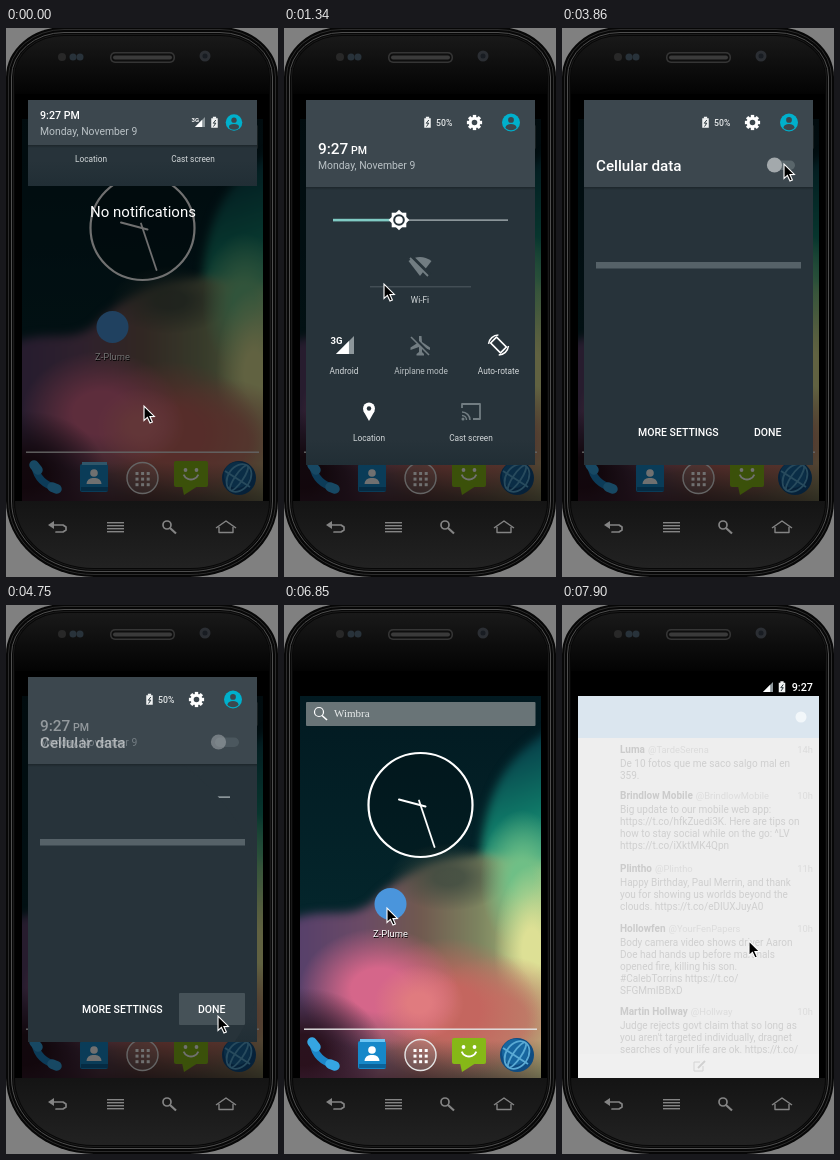
Recreate the animation shown at these times as an HTML page with a canvas. Size 272 px wide and 549 px high, loop 8 s.

```html
<!DOCTYPE html>
<html lang="en">
<head>
<meta charset="utf-8">
<title>Phone quick settings</title>
<style>
html, body { margin: 0; width: 100%; height: 100%; overflow: hidden; background: #808080; }
canvas { display: block; width: 272px; height: 549px; }
</style>
</head>
<body>
<canvas id="stage"></canvas>
<script>
const W = 272, H = 549, LOOP = 8000, STEP = 148.5;
const canvas = document.getElementById('stage');
const c = canvas.getContext('2d');
const dpr = window.devicePixelRatio || 1;
canvas.width = W * dpr;
canvas.height = H * dpr;

const BODY = '#27333a', HEAD = '#3c474e', TEAL = '#80cbc4', FAINT = '#727d82', CYAN = '#00b0cc';
const clamp = v => Math.max(0, Math.min(1, v));
const ramp = (t, a, b) => clamp((t - a) / (b - a));
const ease = p => p * p * (3 - 2 * p);
const mix = (a, b, p) => a + (b - a) * p;

// Pointer tip: time, x, y
const POINTER = [
  [0, 138, 378], [150, 138, 378], [1340, 100, 256], [2230, 60, 320], [2520, 60, 322],
  [2820, 68, 330], [3560, 222, 136], [3860, 222, 136], [4450, 212, 411], [4900, 212, 411],
  [5280, 132, 395], [5650, 121, 290], [5940, 120, 275], [6100, 120, 275], [6700, 103, 303],
  [7300, 103, 303], [7870, 187, 336]
];

function pointerAt(t) {
  let i = 0;
  while (i < POINTER.length - 2 && POINTER[i + 1][0] <= t) i++;
  const [t0, x0, y0] = POINTER[i], [t1, x1, y1] = POINTER[i + 1];
  const p = ease(ramp(t, t0, t1));
  return [mix(x0, x1, p), mix(y0, y1, p)];
}

function text(s, x, y, size, color = '#fff', weight = 400, align = 'left') {
  c.font = `${weight} ${size}px Roboto, sans-serif`;
  c.textAlign = align;
  c.fillStyle = color;
  c.fillText(s, x, y);
}

function rect(x, y, w, h, color) {
  c.fillStyle = color;
  c.fillRect(x, y, w, h);
}

function round(x, y, w, h, r, color) {
  c.beginPath();
  c.roundRect(x, y, w, h, r);
  c.fillStyle = color;
  c.fill();
}

function disc(x, y, r, color) {
  c.beginPath();
  c.arc(x, y, r, 0, 7);
  c.fillStyle = color;
  c.fill();
}

function ring(x, y, r, color, width) {
  c.beginPath();
  c.arc(x, y, r, 0, 7);
  c.strokeStyle = color;
  c.lineWidth = width;
  c.stroke();
}

function trace(pts) {
  c.beginPath();
  for (let i = 0; i < pts.length; i += 2) c.lineTo(pts[i], pts[i + 1]);
}

function poly(pts, color) {
  trace(pts);
  c.closePath();
  c.fillStyle = color;
  c.fill();
}

function line(pts, color, width) {
  trace(pts);
  c.strokeStyle = color;
  c.lineWidth = width;
  c.stroke();
}

function group(alpha, draw) {
  if (alpha <= 0) return;
  c.save();
  c.globalAlpha *= alpha;
  draw();
  c.restore();
}

function clipped(x, y, w, h, draw) {
  c.save();
  c.beginPath();
  c.rect(x, y, w, h);
  c.clip();
  draw();
  c.restore();
}

function gradient(x0, y0, x1, y1, colors) {
  const g = c.createLinearGradient(x0, y0, x1, y1);
  colors.forEach((col, i) => g.addColorStop(i / (colors.length - 1), col));
  return g;
}

const vertical = (y0, y1, ...colors) => gradient(0, y0, 0, y1, colors);

function blob(x, y, rx, ry, color, core = 0.25) {
  c.save();
  c.translate(x, y);
  c.scale(rx, ry);
  const g = c.createRadialGradient(0, 0, 0, 0, 0, 1);
  g.addColorStop(0, color);
  g.addColorStop(core, color);
  g.addColorStop(1, color.slice(0, 7) + '00');
  disc(0, 0, 1, g);
  c.restore();
}

// Phone outline, moved inwards by d
function shell(d) {
  const top = { x: 58 - d, y: 50 - d }, base = { x: 88 - d, y: 76 - d };
  c.beginPath();
  c.roundRect(d, d - 1, W - 2 * d, H + 1 - 2 * d, [top, top, base, base]);
}

function phone() {
  rect(0, 0, W, H, '#808080');
  shell(0);
  c.fillStyle = '#070707';
  c.fill();
  c.lineWidth = 1;
  [[2.5, '#2c2c2c'], [5.5, '#4e4e4e'], [7.5, '#1a1a1a']].forEach(([d, col]) => {
    shell(d);
    c.strokeStyle = col;
    c.stroke();
  });
  c.save();
  shell(9);
  c.clip();
  rect(0, 0, W, 70, vertical(6, 66, '#1a1a1a', '#030303'));
  rect(0, 66, W, 408, '#000');
  rect(0, 473, W, 76, vertical(473, 541, '#141414', '#222222'));
  c.restore();

  round(104, 24, 65, 11, 5, '#353535');
  round(105.5, 25.5, 62, 8, 4, '#0e0e0e');
  round(107, 27.5, 59, 4, 2, '#3a3a3a');
  disc(56, 29, 4, '#282828');
  disc(67, 29, 3.5, '#28323a');
  disc(74, 29, 3.5, '#28323a');
  disc(199, 28, 5.5, '#2b2e33');
  disc(199, 28, 2.5, '#181c22');

  const key = '#848484';
  c.lineCap = c.lineJoin = 'round';
  line([46, 497, 57, 497, 60, 499, 60, 502, 57, 504, 50, 504], key, 1.7);
  poly([42, 497, 48, 493, 48, 501], key);
  c.lineCap = 'butt';
  for (let i = 0; i < 4; i++) rect(101, 494 + i * 3, 17, 1.4, key);
  ring(161, 497, 4, key, 1.7);
  line([164, 500, 170, 505.5], key, 2.2);
  line([210, 500, 220, 493, 230, 500], key, 1.5);
  line([213, 499, 213, 504.5, 227, 504.5, 227, 499], key, 1.4);
}

function wallpaper() {
  rect(16, 91, 241, 382, vertical(91, 320, '#021a21', '#04262c'));
  c.save();
  c.filter = `blur(${5 * dpr}px)`;

  c.beginPath();
  c.moveTo(270, 122);
  c.bezierCurveTo(225, 150, 200, 180, 196, 260);
  c.lineTo(270, 300);
  c.fillStyle = gradient(205, 150, 250, 280, ['#07404a', '#0f7867', '#4bb588']);
  c.fill();

  c.beginPath();
  c.moveTo(0, 318);
  c.bezierCurveTo(40, 298, 60, 318, 88, 298);
  c.bezierCurveTo(115, 268, 150, 256, 200, 250);
  c.lineTo(280, 262);
  c.lineTo(280, 490);
  c.lineTo(0, 490);
  c.fillStyle = gradient(16, 0, 257, 0, ['#57406a', '#6a4a66', '#70594f', '#7d8560', '#b6cb84']);
  c.fill();
  c.restore();

  blob(165, 272, 60, 34, '#3d4a3fcc');
  blob(238, 275, 42, 70, '#6fbf86');
  blob(248, 345, 38, 85, '#dde095');
  blob(215, 415, 80, 65, '#bd7f69', 0.35);
  blob(165, 405, 90, 72, '#c4665f', 0.35);
  blob(95, 385, 80, 62, '#d5668a', 0.35);
  blob(135, 398, 45, 38, '#e07b7f');
  blob(20, 445, 80, 62, '#2a121e');
  rect(16, 435, 241, 38, vertical(435, 473, '#2a0f1a00', '#2a0f1a88'));
}

function dock() {
  rect(20, 423.5, 233, 1.4, '#e4e4e4');

  c.lineCap = 'round';
  c.beginPath();
  c.moveTo(29, 439);
  c.quadraticCurveTo(32, 455, 50, 460);
  c.strokeStyle = '#1c86c8';
  c.lineWidth = 7;
  c.stroke();
  line([28, 437, 32, 442], '#35a5e2', 9.5);
  line([46, 459, 51, 461], '#35a5e2', 9.5);
  c.lineCap = 'butt';

  round(74, 436, 28, 28, 2, '#1688c9');
  rect(76, 434, 25, 3, '#6cc5f2');
  rect(75, 459, 27, 4, '#0c6299');
  disc(88, 445, 3.8, '#fff');
  round(80.5, 450, 15, 6, [6, 6, 0, 0], '#fff');

  disc(136.5, 450, 16, '#ffffff20');
  ring(136.5, 450, 15.5, '#e4e4e4', 1.4);
  for (let i = 0; i < 9; i++) rect(129.5 + i % 3 * 5.6, 444 + (i / 3 | 0) * 5.6, 3, 3, '#fff');

  round(168, 433, 34, 26, 2, '#86b817');
  poly([176, 458, 192, 458, 178, 467], '#86b817');
  disc(179.5, 442, 1.9, '#fff');
  disc(190.5, 442, 1.9, '#fff');
  c.beginPath();
  c.arc(185, 443.5, 8, 0.4, 2.75);
  c.strokeStyle = '#fff';
  c.lineWidth = 1.8;
  c.stroke();

  disc(233, 450, 17, '#0e4c82');
  disc(231, 447, 13, '#17669f');
  c.lineWidth = 1.8;
  c.strokeStyle = '#5aaad4';
  [4, 11].forEach(r => {
    c.beginPath();
    c.ellipse(233, 450, r, 15, 0.6, 0, 7);
    c.stroke();
  });
  line([219, 443, 244, 459], '#5aaad4', 1.8);
}

function home() {
  clipped(16, 91, 241, 382, wallpaper);
  round(22, 97, 229.5, 24, 1, '#697477');
  ring(35, 107, 4.5, '#fff', 1.2);
  line([38, 110.5, 43, 115], '#fff', 1.6);
  c.font = '11px "Liberation Serif", serif';
  c.textAlign = 'left';
  c.fillStyle = '#e8ecec';
  c.fillText('Wimbra', 50, 112);

  disc(136.5, 200, 52, '#00000030');
  ring(136.5, 200, 52, '#fff', 2.2);
  c.lineCap = 'round';
  line([141.5, 201.5, 115, 194.5], '#fff', 2);
  line([135, 195.5, 150.5, 242], '#fff', 1.8);
  c.lineCap = 'butt';

  disc(106.5, 299, 16, '#4a95dc');
  text('Z-Plume', 107, 333, 9.4, '#000', 400, 'center');
  text('Z-Plume', 106.5, 332, 9.4, '#fff', 400, 'center');
  dock();
}

function battery(x, y, h) {
  const w = h * 0.62;
  rect(x - w / 2, y - h / 2 + 1, w, h - 1, '#f0f2f2');
  rect(x - w / 4, y - h / 2 - 0.5, w / 2, 2, '#f0f2f2');
  line([x + 1.3, y - 2.5, x - 1.2, y + 0.7, x + 1.3, y + 0.7, x - 1, y + 4], '#2c383e', 1);
}

function signal(x, y, s) {
  poly([x, y, x + s, y, x + s, y - s], '#8d979b');
  poly([x, y, x + s * 0.72, y, x + s * 0.72, y - s * 0.72], '#fff');
}

function avatar(x, y, r) {
  disc(x, y, r, CYAN);
  disc(x, y - r * 0.28, r * 0.32, HEAD);
  c.beginPath();
  c.ellipse(x, y + r * 0.52, r * 0.6, r * 0.34, 0, 0, 7);
  c.fill();
}

function gear(x, y) {
  c.save();
  c.translate(x, y);
  for (let i = 0; i < 8; i++) {
    c.rotate(Math.PI / 4);
    rect(-1.7, -7.6, 3.4, 4, '#fff');
  }
  c.restore();
  ring(x, y, 4.3, '#fff', 3);
}

function label(s, x, y, dim) {
  text(s, x, y, 8.3, dim ? '#b9c0c3' : '#d3d8da', 400, 'center');
}

function tiles() {
  rect(115, 191.5, 109, 1.2, '#b6bfc2');
  rect(49, 190.8, 64, 2.6, TEAL);
  c.save();
  c.translate(115, 192);
  for (let i = 0; i < 2; i++) {
    c.rotate(Math.PI / 4);
    rect(-7.3, -7.3, 14.6, 14.6, '#fff');
  }
  c.restore();
  disc(115, 192, 5.8, BODY);
  disc(115, 192, 3.8, '#fff');

  c.beginPath();
  c.moveTo(136, 248);
  c.lineTo(124.5, 233);
  c.quadraticCurveTo(136, 225, 147.5, 233);
  c.fillStyle = FAINT;
  c.fill();
  line([127, 228, 146, 247], BODY, 3.4);
  line([126, 230, 144, 248], FAINT, 1.8);
  label('Wi-Fi', 136, 275);
  rect(86, 258.3, 101, 1, '#4f5b61');

  signal(52, 326, 18);
  rect(46, 307, 13, 10.5, BODY);
  text('3G', 46.5, 316, 9.5, '#fff', 700);
  label('Android', 60, 346);

  poly([135, 308, 137.5, 308, 138, 314, 146, 319.5, 146, 322, 138, 319, 138, 324,
    140, 326, 140, 327.5, 132.5, 327.5, 132.5, 326, 135, 324, 135, 319, 126.5, 322, 126.5, 319.5, 135, 314], FAINT);
  line([128, 308, 146, 326], BODY, 3);
  line([127, 309, 145, 327], FAINT, 1.6);
  label('Airplane mode', 137, 346, true);

  c.save();
  c.translate(214.5, 317);
  c.rotate(-Math.PI / 4);
  c.strokeStyle = '#fff';
  c.lineWidth = 1.7;
  c.strokeRect(-4.2, -7, 8.4, 14);
  c.restore();
  c.strokeStyle = '#fff';
  c.lineWidth = 1.5;
  [0.9, 4.05].forEach(a => {
    c.beginPath();
    c.arc(214.5, 317, 10, a - 0.8, a + 0.65);
    c.stroke();
  });
  label('Auto-rotate', 214.5, 346);

  disc(85, 380.5, 6, '#fff');
  poly([79.4, 383, 90.6, 383, 85, 393], '#fff');
  disc(85, 380.5, 2.2, BODY);
  label('Location', 85, 413);

  line([178, 380, 178, 376, 196, 376, 196, 391, 189, 391], FAINT, 1.8);
  disc(179, 391, 1.5, FAINT);
  [4.5, 8].forEach(r => {
    c.beginPath();
    c.arc(178, 392, r, -1.57, 0);
    c.lineWidth = 1.5;
    c.stroke();
  });
  label('Cast screen', 187, 413);
}

function detail(t) {
  rect(22, 159, 229, 278, BODY);
  rect(34, 234, 205, 6.5, '#566268');
  if (t >= 4435) round(173, 388, 66, 32, 1, '#465258');
  text('MORE SETTINGS', 76, 407.5, 10.5, '#fff', 500);
  text('DONE', 192, 407.5, 10.5, '#fff', 500);
}

function toggle(on) {
  round(209, 132.5, 24, 9.5, 5, on ? '#4a7f7d' : '#59656a');
  disc(on ? 229 : 212.5, 137, 7.6, on ? TEAL : '#a3a9ac');
}

function shade(t) {
  const up = 51 * ramp(t, 5960, 6830);
  const closing = ease(ramp(t, 5280, 5720));
  const open = 1 - Math.pow(1 - ramp(t, 0, 1150), 3);
  const bottom = t < 5280 ? mix(158, 437, open) : mix(437, 123, closing);
  const e = clamp((bottom - 158) / 279);
  const head = mix(117, 159, e);

  const notice = clamp(1 - e * 3) * (t > 5280 ? 0.7 * (1 - ramp(t, 5960, 6550)) : 1);
  group(notice, () => text('No notifications', 137, bottom + 31 - up, 15, '#fff', 400, 'center'));

  clipped(22, 72, 229, 400, () => {
    c.translate(0, -up);
    rect(22, 72, 229, bottom - 72, closing === 1 ? '#35434a' : BODY);
    clipped(22, head, 229, Math.max(0, bottom - head), () => {
      c.translate(0, bottom - 437);
      rect(22, 412, 229, 25, vertical(412, 437, BODY, '#212e35'));
      tiles();
    });

    const r = t < 4600 ? Math.min(260, 253 * (t - 2430) / 565) : 201 - (t - 4755) * 0.45;
    if (r > 0 && t < 5300) {
      c.save();
      c.beginPath();
      c.rect(22, 159, 229, 278);
      c.clip();
      c.beginPath();
      c.arc(60, 325, r, 0, 7);
      c.clip();
      detail(t);
      c.restore();
    }

    rect(22, 72, 229, head - 72, HEAD);
    rect(22, head, 229, 3, vertical(head, head + 3, '#00000044', '#00000000'));

    const m = t < 4000 ? ramp(t, 2490, 2840) : 1 - ramp(t, 4600, 4940);
    group(1 - m, () => {
      const size = mix(10.7, 15.4, e), y = mix(91, 125.5, e);
      text('9:27', 34, y, size, '#fff', 500);
      const x = 34 + c.measureText('9:27').width + 2.6;
      text('PM', x, y, 10.6, '#fff', 500);
      text('Monday, November 9', 34, mix(107, 141, e), 10.4, '#b9c1c5');
    });
    group(m, () => {
      text('Cellular data', 34, 143, 15.2, '#fff', 500);
      toggle(t < 3850);
    });

    group(1 - e, () => {
      if (t < 3850) text('3G', 185.5, 94, 6, '#fff', 700);
      signal(189, 99, 10);
      battery(208.5, 94.5, 10.5);
    });
    group(e, () => {
      battery(143.5, 94.5, 10.5);
      text('50%', 152, 98, 8.7, '#e6e9ea', 500);
      gear(190.5, 94.5);
    });
    avatar(mix(228, 227, e), 94.5, mix(8.3, 9, e));
  });
}

const POSTS = [
  [148, 'Luma', '@TardeSerena', '14h', ['De 10 fotos que me saco salgo mal en', '359.']],
  [194, 'Brindlow Mobile', '@BrindlowMobile', '10h', ['Big update to our mobile web app:',
    'https://t.co/hfkZuedi3K. Here are tips on', 'how to stay social while on the go: ^LV', 'https://t.co/iXktMK4Qpn']],
  [267, 'Plintho', '@Plintho', '11h', ['Happy Birthday, Paul Merrin, and thank',
    'you for showing us worlds beyond the', 'clouds. https://t.co/eDIUXJuyA0']],
  [327, 'Hollowfen', '@YourFenPapers', '10h', ['Body camera video shows driver Aaron',
    'Doe had hands up before marshals', 'opened fire, killing his son.', '#CalebTorrins https://t.co/', 'SFGMmIBBxD']],
  [410, 'Martin Hollway', '@Hollway', '10h', ['Judge rejects govt claim that so long as',
    "you aren't targeted individually, dragnet", 'searches of your life are ok. https://t.co/']]
];

function app(t) {
  const show = ramp(t, 7140, 7480);
  group(show, () => clipped(16, 91, 241, 382, () => {
    c.translate(0, 30 * (1 - ease(show)));
    rect(16, 91, 241, 382, '#eee');
    rect(16, 91, 241, 42, t < 7860 ? '#e4ebf0' : '#dbe6ef');
    disc(239, 112, 5.5, '#f2f7fa');
    group(ramp(t, 7600, 7870), () => POSTS.forEach(([y, name, user, age, lines]) => {
      text(name, 58, y, 10, '#cbcbcb', 700);
      const x = 58 + c.measureText(name).width + 3;
      text(user, x, y, 9.4, '#dcdcdc');
      text(age, 251, y, 9.4, '#dcdcdc', 400, 'right');
      lines.forEach((s, i) => text(s, 58, y + 14 + i * 12, 10, '#cfcfcf'));
    }));
    rect(16, 449, 241, 24, '#f0f0f0');
    line([138, 457, 132, 457, 132, 466, 141, 466, 141, 461], '#d4d4d4', 1);
    line([136, 463, 143, 456], '#d0d0d0', 1.8);
  }));
}

function statusBar() {
  signal(201, 87, 10);
  battery(220, 82, 10.5);
  text('9:27', 251, 86, 10.8, '#fff', 500, 'right');
}

function pointer([x, y]) {
  c.save();
  c.translate(x, y);
  trace([0, 0, 0, 14.5, 3.4, 11.4, 6, 17, 8.4, 16, 5.9, 10.6, 10.4, 10.4]);
  c.closePath();
  c.lineJoin = 'miter';
  c.fillStyle = '#000';
  c.fill();
  c.strokeStyle = '#fff';
  c.lineWidth = 1.1;
  c.stroke();
  c.restore();
}

function draw(t) {
  c.setTransform(dpr, 0, 0, dpr, 0, 0);
  phone();
  clipped(16, 72, 241, 401, () => {
    home();
    const dim = 0.56 * (1 - ramp(t, 5960, 6830));
    if (dim) rect(16, 72, 241, 401, `rgba(0,0,0,${dim})`);
    if (t < 6830) shade(t);
    if (t > 6900) statusBar();
    app(t);
  });
  pointer(pointerAt(t));
}

let shown = -1;
function tick(now) {
  const step = Math.floor((now % LOOP + 5) / STEP);
  if (step !== shown) draw(step * STEP);
  shown = step;
  requestAnimationFrame(tick);
}
requestAnimationFrame(tick);
</script>
</body>
</html>
```
